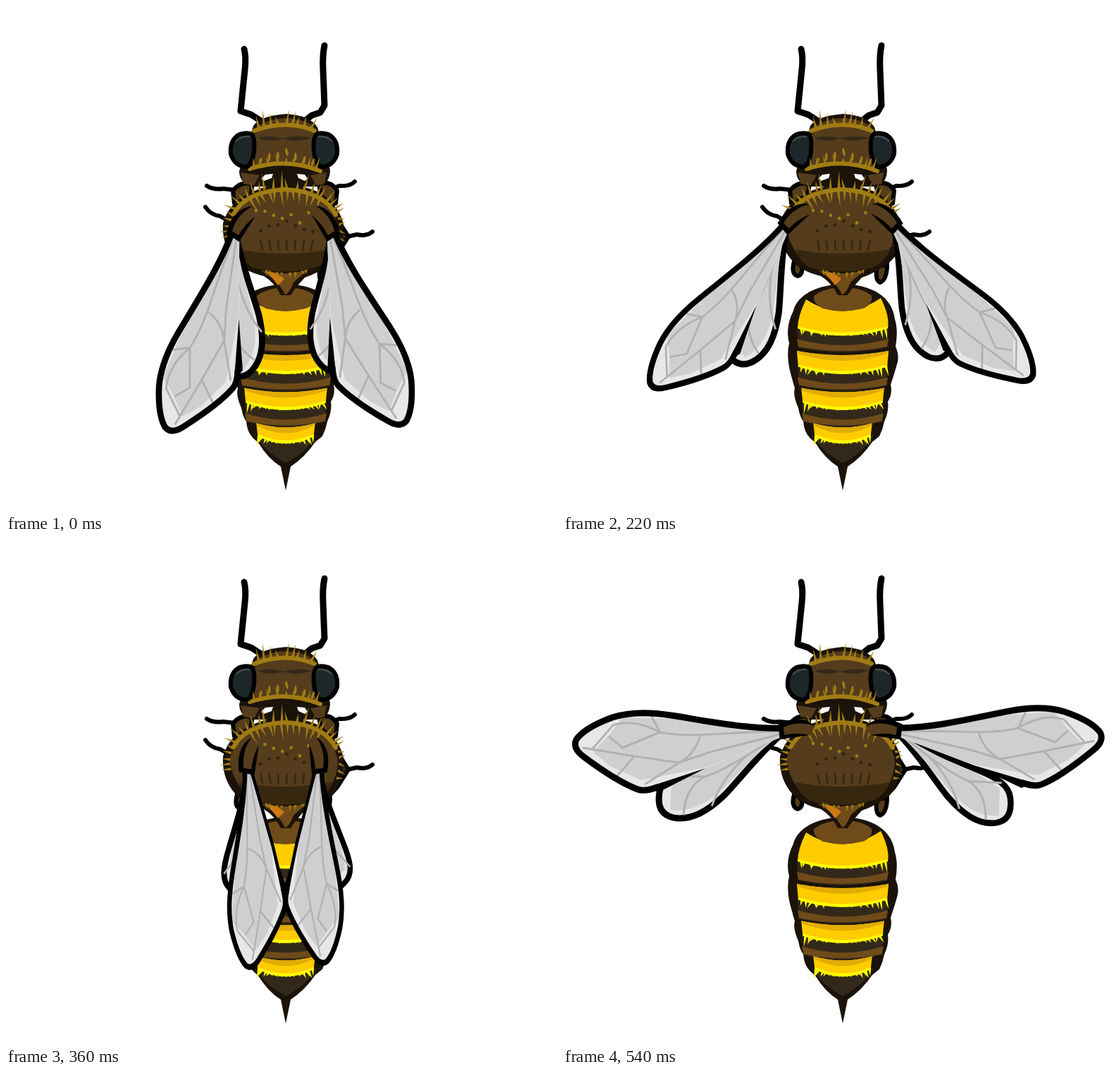
These frames come from a looping animation (782x716 px, 560 ms). An HTML page:

```html
<!DOCTYPE html>
<html lang="en">
<head>
<meta charset="utf-8">
<title>Bee</title>
<style>
html, body { margin: 0; width: 100%; height: 100%; overflow: hidden; background: #fff; }
svg { display: block; width: 782px; height: 716px; }
.ink { fill: none; stroke: #000; stroke-width: 9; stroke-linecap: round; stroke-linejoin: round; }
.thin { stroke-width: 6; }
.gold { fill: none; stroke: #a17c14; stroke-width: 6; stroke-linecap: round; }
.night { fill: #1b130a; }
.dark { fill: #33291a; }
.brown { fill: #543c1c; }
.cap { fill: #6f4b1a; }
.yellow { fill: #ffcc00; }
.shade { fill: #e2ac06; }
.eye { fill: #1d2628; }
.wing path { vector-effect: non-scaling-stroke; }
.rim { fill: #e7e7e7; }
.pane { fill: #cfcfcf; }
.vein { fill: none; stroke: #b1b1b1; stroke-width: 3; stroke-linejoin: round; }
</style>
</head>
<body>
<svg viewBox="0 0 782 716">
  <defs>
    <g id="hind">
      <path class="ink rim" d="M0,0C-30,30-75,55-107,75C-135,92-150,105-149,124C-148,145-140,157-122,157C-95,156-75,135-58,108C-42,80-25,40 0,4"/>
      <path class="pane" d="M-2,4C-35,36-75,62-108,82L-136,108L-128,147Q-95,145-68,108C-48,78-28,38-2,6Z"/>
      <path class="vein" d="M-3,5Q-60,70-92,90L-140,100M-92,90Q-115,110-108,150M-40,45Q-68,85-72,128"/>
    </g>
    <g id="fore">
      <path class="rim" d="M0,-4C-50,-2-110,-14-162,-22C-200,-28-225,-26-247,-19C-272,-10-290,0-299,12C-304,22-298,30-288,37C-262,56-235,74-210,83C-190,88-165,72-147,66L-112,53L0,8Z"/>
      <path class="pane" d="M0,-2C-60,-2-120,-12-165,-17L-232,-19L-250,4L-275,30L-250,50L-205,70L-112,52L0,8Z"/>
      <path class="vein" d="M0,1C-80,0-125,12-178,2L-190,-20M-178,2Q-215,-18-246,-8L-276,26M-120,8Q-128,34-150,45L-215,36L-290,24M-215,36L-240,64M-150,45L-200,76M0,4L-105,30L-150,45M-178,2L-232,24L-252,8"/>
      <path d="M-196,80L-112,53L-180,87Z"/>
      <path class="ink" d="M0,-4C-50,-2-110,-14-162,-22C-200,-28-225,-26-247,-19C-272,-10-290,0-299,12C-304,22-298,30-288,37C-262,56-235,74-210,83C-202,86-193,84-182,80"/>
    </g>
    <path id="edge" class="ink thin" d="M-182,80L-112,55L0,8"/>
    <g id="shoulder">
      <path class="brown" d="M-2,-9C15,-16 34,-15 46,-4L38,8Q18,3 2,12Z"/>
      <path d="M46,-4C34,-18 14,-18-6,-10L-5,12Q8,11 38,8Q18,3 2,6L1,-5Q24,-14 46,-4Z"/>
    </g>
    <g id="eye">
      <path class="ink eye thin" d="M347,181Q354,184 352,206Q350,224 342,228Q325,228 319,210Q317,190 331,182Q340,179 347,181Z"/>
      <path d="M326,192Q333,184 346,185" fill="none" stroke="#465052" stroke-width="2"/>
    </g>
  </defs>

  <g id="legs">
    <path class="ink thin" d="M285,255Q294,261 308,259L335,262M283,285Q290,296 304,298L318,306M495,249Q488,256 473,255L455,262M520,320Q512,327 498,324L484,327L462,360"/>
    <path class="ink brown thin" d="M328,362Q323,380 333,383Q342,380 338,368ZM447,365Q441,388 450,392Q460,388 460,366ZM322,262Q332,248 350,252L345,282L324,280ZM470,262Q462,247 444,252L449,282L468,280Z"/>
    <path class="ink dark thin" d="M474,308L486,327L470,352L455,368L460,310Z"/>
  </g>

  <g id="abdomen">
    <path class="night" d="M397,394C350,396 331,416 327,432Q315,456 321,478Q317,495 322,517Q326,532 329,542Q326,552 334,570Q336,582 341,589Q342,604 351,613L358,619Q372,642 390,653L397,687L404,653Q424,640 439,618L449,610Q454,600 456,589Q463,574 461,561Q468,550 465,537Q470,522 474,508Q478,496 472,483Q476,460 471,444C468,420 450,396 397,394Z"/>
    <path class="dark" d="M354,609Q397,626 441,608Q428,632 397,648Q367,632 354,609Z"/>
    <g id="bands"></g>
    <path class="cap" d="M356,411Q372,399 397,399Q425,399 438,411Q440,424 425,429Q397,436 369,429Q354,421 356,411Z"/>
  </g>

  <g id="antennae">
    <path class="ink" d="M338,61Q341,73 339,90L333,149L348,154L362,163"/>
    <path class="ink" d="M452,56Q449,70 450,90L452,141L446,151L434,155L424,163"/>
  </g>

  <g id="head">
    <path class="night" d="M351,170Q360,156 397,153Q432,155 442,172L460,232Q460,248 448,256L345,256Q331,248 331,234Z"/>
    <path class="brown" d="M354,172Q375,159 397,159Q424,160 438,172L442,230Q397,213 350,230ZM333,236L360,240L352,254L337,252ZM455,236L432,240L440,254L452,252Z"/>
    <path class="dark" d="M357,187Q375,182 393,188Q414,182 434,187Q414,193 402,190Q393,187 386,190Q370,193 357,187Z"/>
    <path d="M362,245L368,239L379,238L377,244L366,248ZM428,245L424,239L413,238L415,244L424,248Z" fill="#fff"/>
    <path class="gold" d="M352,177Q397,160 438,177M346,231Q397,214 446,234"/>
    <use href="#eye"/>
    <use href="#eye" transform="translate(789 0) scale(-1 1)"/>
  </g>

  <g id="thorax">
    <path class="night" d="M344,266Q395,240 448,266Q474,285 479,310Q480,345 462,365Q440,380 424,385Q410,400 404,410L390,410Q381,392 366,383Q340,377 326,362Q306,340 308,308Q316,280 344,266Z"/>
    <path class="brown" d="M346,274Q395,246 446,274Q468,292 471,315Q470,345 452,358Q395,368 336,356Q318,335 318,310Q326,285 346,274Z"/>
    <path fill="#38270f" d="M330,345Q390,357 464,345Q455,368 434,372Q395,382 350,371Q335,362 330,345Z"/>
    <path class="cap" d="M362,375Q395,384 430,374Q416,384 408,392Q402,408 396,409Q390,398 384,391Q374,383 362,375Z"/>
    <path fill="#cc7914" d="M370,377Q382,375 395,387L386,396Q379,386 370,377Z"/>
    <path class="gold" d="M323,295Q340,263 395,260Q450,262 468,296"/>
  </g>
  <g id="hair" fill="#a17c14"></g>

  <g id="wings"></g>
</svg>
<script>
const $ = id => document.getElementById(id);
const mix = (a, b, k) => a + (b - a) * k;
const rand = i => { const s = Math.sin(i * 12.9898) * 43758.5453; return s - Math.floor(s); };
const shape = (cls, d) => `<path class="${cls}" d="${d}"/>`;
const CX = 397;

// Tapered hairs along a quadratic curve; a negative length points up from left to right.
// "ends" makes the middle of the row shorter.
function fringe(x0, y0, cx, cy, x1, y1, n, len, ends = 0) {
  let d = '';
  for (let i = 0; i < n; i++) {
    const t = (i + 0.2 + 0.6 * rand(i + x0)) / n;
    const x = mix(mix(x0, cx, t), mix(cx, x1, t), t);
    const y = mix(mix(y0, cy, t), mix(cy, y1, t), t);
    const dir = Math.atan2(mix(cy - y0, y1 - cy, t), mix(cx - x0, x1 - cx, t));
    const ux = 2 * Math.cos(dir), uy = 2 * Math.sin(dir);
    const h = len / 2 * (0.5 + 0.6 * rand(i * 3 + y0)) * mix(1, (2 * t - 1) ** 2, ends);
    const lean = rand(i * 7 + x1) * 4 - 2;
    d += `M${x - ux},${y - uy}L${x - uy * h + ux * lean},${y + ux * h + uy * lean}L${x + ux},${y + uy}Z`;
  }
  return `<path d="${d}"/>`;
}

// Body slice between two sagging curves.
const slice = (half, y0, sag0, y1, sag1) =>
  `M${CX - half},${y0}Q${CX},${y0 + 2 * sag0} ${CX + half},${y0}L${CX + half - 2},${y1}Q${CX},${y1 + 2 * sag1} ${CX - half + 2},${y1}Z`;

// Four yellow bands, narrower towards the sting.
let bands = '';
for (let i = 0; i < 4; i++) {
  const bulge = Math.sin(i * Math.PI / 3);
  const half = 66 - 0.9 * i ** 3, top = 434 + 52.5 * i + 3 * bulge, low = 457 + 51 * i + 4 * bulge;
  const l = CX - half + 2, r = CX + half - 2;
  if (i < 3) bands += shape('dark', slice(half - 1, low, 8, low + 27, 7)) + shape('cap', slice(half - 1, low + 15, 9, low + 26, 6));
  bands += i
    ? shape('yellow', slice(half, top, 6, low, 9)) + shape('shade', slice(half, top, 6, top + 4, 10))
    : shape('yellow', `M345,416Q333,440 ${l},${low}Q${CX},${low + 20} ${r},${low}Q464,440 451,414Q${CX},450 345,416Z`);
  bands += `<g fill="#ff0"><path d="M${l},${low - 3}Q${CX},${low + 15} ${r},${low - 3}V${low}Q${CX},${low + 21} ${l},${low}Z"/>`
    + fringe(l, low - 1, CX, low + 18, r, low - 1, 19, 17, 0.85) + '</g>';
}
$('bands').innerHTML = bands;

let hair = fringe(352, 175, 397, 158, 438, 175, 9, -21)
  + fringe(346, 231, 397, 214, 446, 234, 9, -17)
  + fringe(325, 291, 340, 258, 395, 258, 9, -23)
  + fringe(395, 258, 450, 259, 467, 291, 9, -23)
  + fringe(340, 277, 395, 247, 450, 277, 12, 22)
  + fringe(321, 332, 314, 312, 324, 292, 5, -14)
  + fringe(467, 292, 478, 310, 468, 342, 6, -14)
  + fringe(364, 373, 397, 383, 430, 373, 8, 9);
for (let i = 0; i < 14; i++) {
  const x = 355 + 6.2 * i, y = 290 + 18 * rand(i), tall = i % 2 ? 6 : 0;
  hair += `<circle cx="${x}" cy="${y + 2 * tall}" r="2.4" fill="${tall ? '#33240f' : '#a17c14'}"/>`;
  if (tall) hair += `<ellipse cx="${x}" cy="${y - 86}" rx="1.8" ry="${tall}" transform="rotate(${40 * rand(i) - 20} ${x} ${y - 86})"/>`
    + `<path d="M${x},332l${(x - CX) / -12},15" stroke="#38270f" stroke-width="2.5"/>`;
}
$('hair').innerHTML = hair;

// Step, fore wing angle, hind wing angle, fore wing width.
const keys = [
  [0, 68, -45, 0.96],
  [4, 88, -42, 0.72],
  [7, 7.5, 0, 0.92],
  [11, 47, -24, 0.88],
  [13, 0, 14, 1],
  [14, 68, -45, 0.96]
];
const STEP = 20, STEPS = 14;

$('wings').innerHTML = ['', 'translate(794 0) scale(-1 1)'].map(side => `<g class="wing" transform="${side}">
  <use href="#hind"/><use href="#fore"/><use href="#edge"/><use href="#shoulder"/></g>`).join('');
const wings = [...document.querySelectorAll('.wing')].map(g => [...g.children]);

// The root slides inwards and down as the wing folds; the right wing sits slightly higher.
function pose([hind, fore, edge, shoulder], right, angle, hindAngle, width) {
  const fold = angle / 88, drop = Math.sin(angle * Math.PI / 180), tight = fold ** 8;
  const x = 312 + 30 * fold ** 3.5 + 7 * right, y = 272 + 55 * drop;
  const at = `translate(${x} ${y})`;
  const spread = `${at} rotate(${2 * right - angle}) scale(${0.98 - 0.02 * right - 0.05 * tight} ${width})`;
  hind.setAttribute('transform', `${at} rotate(${hindAngle + right * (10 * fold - 5)}) scale(${1 - 0.04 * right - 0.12 * tight})`);
  fore.setAttribute('transform', spread);
  edge.setAttribute('transform', spread);
  edge.setAttribute('opacity', Math.max(0, 8 * fold - 7));
  const turn = Math.atan2(270 + 20 * drop - y, 351 + 5 * right - x) * 180 / Math.PI;
  shoulder.setAttribute('transform', `${at} rotate(${turn})`);
}

const start = performance.now();
function draw() {
  const step = Math.floor((performance.now() - start + 0.01) / STEP) % STEPS;
  const next = keys.findIndex(k => k[0] > step);
  const a = keys[next - 1], b = keys[next], k = (step - a[0]) / (b[0] - a[0]);
  const [, ...now] = a.map((v, i) => mix(v, b[i], k));
  wings.forEach((parts, right) => pose(parts, right, ...now));
  requestAnimationFrame(draw);
}
draw();
</script>
</body>
</html>
```
